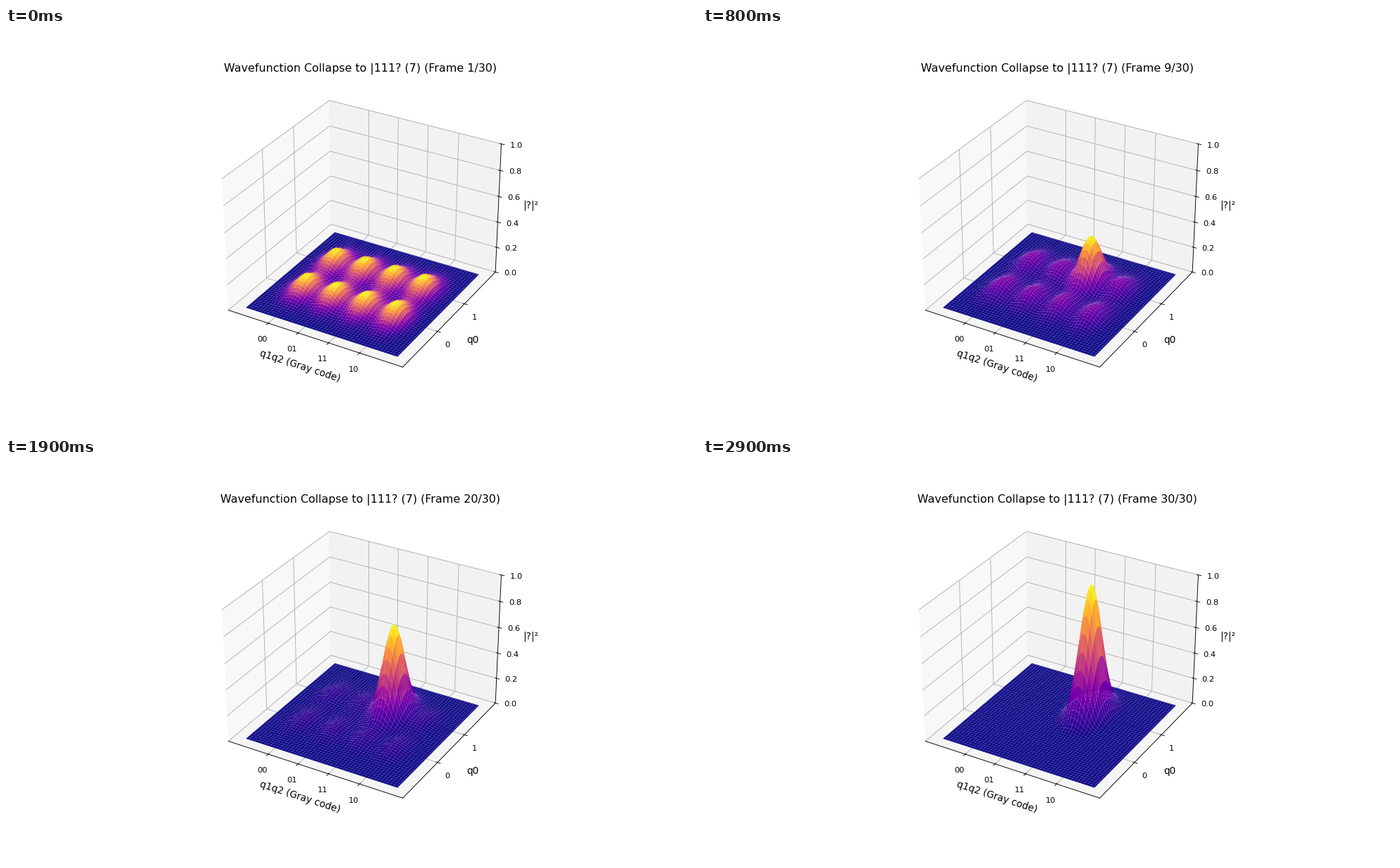
These frames come from a looping animation (980x572 px, 3 s). A matplotlib script:

```python
import numpy as np
import matplotlib.pyplot as plt
from matplotlib.animation import FuncAnimation

WIDTH, HEIGHT = 980, 572
DPI = WIDTH / 12
FRAMES, INTERVAL = 30, 100

N_X, N_Y = 4, 2          # basis states along each axis
TARGET = (2, 1)          # position of |111> in Gray code order
SPREAD = 0.15            # 2 * sigma ** 2 of each bump

X, Y = np.meshgrid(np.linspace(-1, N_X, 100), np.linspace(-1, N_Y, 100))


def bump(cx, cy):
    return np.exp(-((X - cx) ** 2 + (Y - cy) ** 2) / SPREAD)


UNIFORM = sum(bump(i, j) for i in range(N_X) for j in range(N_Y)) / (N_X * N_Y)
COLLAPSED = bump(*TARGET)


def padded(lo, hi):
    """Axis limits: 5 % data margin, then 1/48 of the view on each side."""
    half = (hi - lo) / 2 * 1.1 * 25 / 24
    mid = (lo + hi) / 2
    return mid - half, mid + half


plt.rcParams["font.family"] = "DejaVu Sans"
fig = plt.figure(figsize=((WIDTH + 1e-6) / DPI, (HEIGHT + 1e-6) / DPI), dpi=DPI)
ax = fig.add_subplot(111, projection="3d")
ax.set_xlim(*padded(-1, N_X))
ax.set_ylim(*padded(-1, N_Y))
ax.set_zlim(0, 1)
ax.set_xticks(range(N_X), ["00", "01", "11", "10"])
ax.set_yticks(range(N_Y), ["0", "1"])
ax.set_xlabel("q1q2 (Gray code)", fontsize=12)
ax.set_ylabel("q0", fontsize=12)
ax.set_zlabel("|?|²", fontsize=12)


def update(i):
    for surface in list(ax.collections):
        surface.remove()
    t = i / (FRAMES - 1)
    # the default sampling keeps every second grid line, with finely curved edges
    ax.plot_surface(X, Y, (1 - t) * UNIFORM + t * COLLAPSED, cmap="plasma")
    ax.set_title(f"Wavefunction Collapse to |111? (7) (Frame {i + 1}/{FRAMES})",
                 fontsize=14)
    return []


anim = FuncAnimation(fig, update, frames=FRAMES, interval=INTERVAL,
                     repeat=True, repeat_delay=0, blit=False)
plt.show()
```
